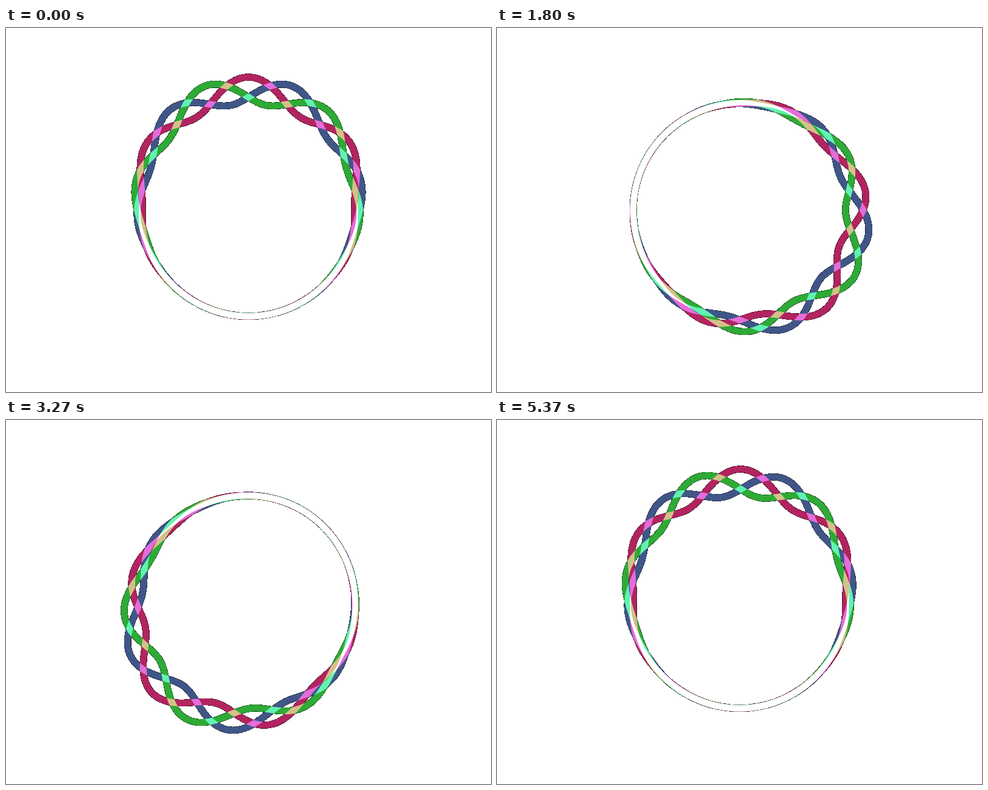
Write an HTML page with a canvas that moves like this. It is 800x600 px and loops after 5400 ms.

```html
<!DOCTYPE html>
<html lang="en">
<head>
<meta charset="utf-8">
<title>Braided ring</title>
<style>
  html, body { margin: 0; width: 100%; height: 100%; overflow: hidden; background: #fff; }
  canvas { display: block; }
</style>
</head>
<body>
<canvas id="stage" width="800" height="600"></canvas>
<script>
const ctx = document.getElementById('stage').getContext('2d', { willReadFrequently: true });
const TAU = 2 * Math.PI;
const LOOP = 5400, STEP = 30;
const RADIUS = 175, SWELL = 22, REST = 0.2, LOBES = 6, POINTS = 720;
const BAND = 11, DARK = 13, CUT = 3 * DARK + 12;
const BOX = { x: 165, y: 65, size: 470 };
const STRANDS = [
  { color: 'rgb(165,23,83)', phase: 0 },
  { color: 'rgb(51,73,123)', phase: -TAU / 3 },
  { color: 'rgb(33,157,41)', phase: TAU / 3 }
];

// Angles run clockwise from the top; the swelling travels clockwise
// while the braid itself slides slowly the other way.
function strandPath(phase, p) {
  const path = new Path2D();
  for (let i = 0; i < POINTS; i++) {
    const a = TAU * i / POINTS;
    const near = (1 + Math.cos(a - TAU * p)) / 2;
    const swell = REST + (SWELL - REST) * near * near;
    const r = RADIUS + swell * (1 + Math.cos(LOBES * a + 2 * TAU * p + phase));
    path.lineTo(400 + r * Math.sin(a), 300 - r * Math.cos(a));
  }
  path.closePath();
  return path;
}

// The untouched dark ground turns white; soft band edges stay dark.
function whitenGround() {
  const image = ctx.getImageData(BOX.x, BOX.y, BOX.size, BOX.size);
  const px = image.data;
  for (let i = 0; i < px.length; i += 4) {
    if (px[i] + px[i + 1] + px[i + 2] < CUT) px[i] = px[i + 1] = px[i + 2] = 255;
  }
  ctx.putImageData(image, BOX.x, BOX.y);
}

function draw(p) {
  ctx.globalCompositeOperation = 'source-over';
  ctx.clearRect(0, 0, 800, 600);
  ctx.fillStyle = `rgb(${DARK},${DARK},${DARK})`;
  ctx.fillRect(BOX.x, BOX.y, BOX.size, BOX.size);
  // Light adds up where strands overlap: all three give white.
  ctx.globalCompositeOperation = 'lighter';
  ctx.lineJoin = 'round';
  ctx.lineWidth = BAND;
  for (const { color, phase } of STRANDS) {
    ctx.strokeStyle = color;
    ctx.stroke(strandPath(phase, p));
  }
  whitenGround();
}

const start = performance.now();
function tick() {
  const t = (performance.now() - start) % LOOP;
  draw(Math.floor(t / STEP) * STEP / LOOP);
  requestAnimationFrame(tick);
}
tick();
</script>
</body>
</html>
```
